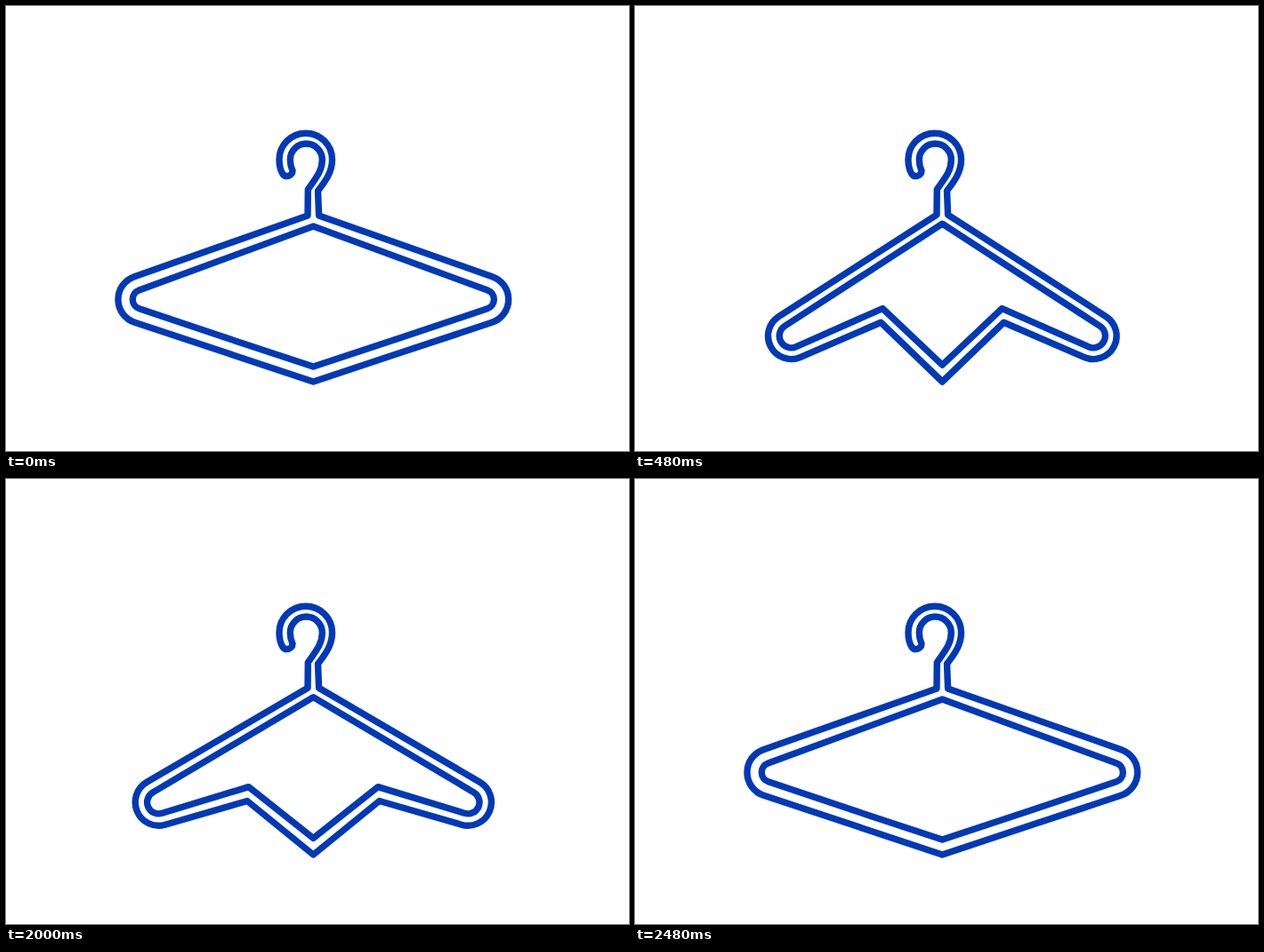
An HTML page for the animation above (3440 ms loop, 700 by 501 pixels).

```html
<!DOCTYPE html>
<html lang="en">
<head>
<meta charset="utf-8">
<title>Hanger</title>
<style>
  html, body { margin: 0; width: 100%; height: 100%; overflow: hidden; background: #fff; }
  svg { display: block; width: 700px; height: 501px; }
  path { fill: none; stroke: #0039b6; stroke-width: 7.4; stroke-linejoin: round; }
</style>
</head>
<body>
<svg viewBox="0 0 700 501">
  <path id="outer"/>
  <path id="inner"/>
</svg>
<script>
const LOOP = 3440, STEP = 40;
const FOLD_END = 800, OPEN_START = 1800, OPEN_END = 2480;
const AXIS = 345.3;

// From the right side of the stem, around the hook, to the left side.
const HOOK = `L350.5 208 C360 196 366.5 186 366.5 173
  A29.7 29.7 0 0 0 307 173 C307 180 308.5 185 310.8 189
  A6.2 6.2 0 0 0 322 185.5 C320 181 319.3 177 319.3 173
  A18 18 0 0 1 355.3 173 C355.3 186 348 194 339.3 206.5 Z`;

const lerp = (a, b, s) => a + (b - a) * s;
const mirror = ([x, y]) => [2 * AXIS - x, y];

// Where a line from point p touches a circle; side is -1 or 1.
function tangent([px, py], [cx, cy], r, side) {
  const dx = px - cx, dy = py - cy;
  const angle = Math.atan2(dy, dx) + side * Math.acos(r / Math.hypot(dx, dy));
  return [cx + r * Math.cos(angle), cy + r * Math.sin(angle)];
}

// Two arms wrapped around round ends, meeting at the bottom by way of the notches.
function body(shoulder, centre, r, notch, bottom) {
  const top = tangent(shoulder, centre, r, -1);
  const under = tangent(notch, centre, r, 1);
  const arc = `A${r} ${r} 0 0 0`;
  return `M${shoulder} L${top} ${arc} ${under} L${notch} L${bottom}
    L${mirror(notch)} L${mirror(under)} ${arc} ${mirror(top)} L${mirror(shoulder)}`;
}

function foldAt(t) {
  if (t < FOLD_END) return 1 - Math.pow(1 - t / FOLD_END, 3.1);
  if (t < OPEN_START) return 1;
  if (t < OPEN_END) return 1 - Math.pow((t - OPEN_START) / (OPEN_END - OPEN_START), 1.2);
  return 0;
}

const outer = document.getElementById("outer");
const inner = document.getElementById("inner");

function draw(s) {
  const mix = (a, b) => lerp(a, b, s);
  const centre = [mix(153.3, 177), mix(330.4, 374)];
  const x = mix(248, 279), y = mix(382.2, 346.3);
  const gap = mix(8.4, 7.8), lean = mix(0, 1);

  outer.setAttribute("d", body([339, mix(236, 235)], centre, mix(27.3, 26),
    [x - lean, y + gap], [AXIS, 423]) + HOOK);
  inner.setAttribute("d", body([AXIS, mix(248, 245)], centre, mix(11, 13.5),
    [x + lean, y - gap], [AXIS, mix(406, 404)]) + "Z");
}

const start = performance.now();
function tick() {
  const t = (performance.now() - start) % LOOP;
  draw(foldAt(Math.floor(t / STEP) * STEP));
  requestAnimationFrame(tick);
}
tick();
</script>
</body>
</html>
```
